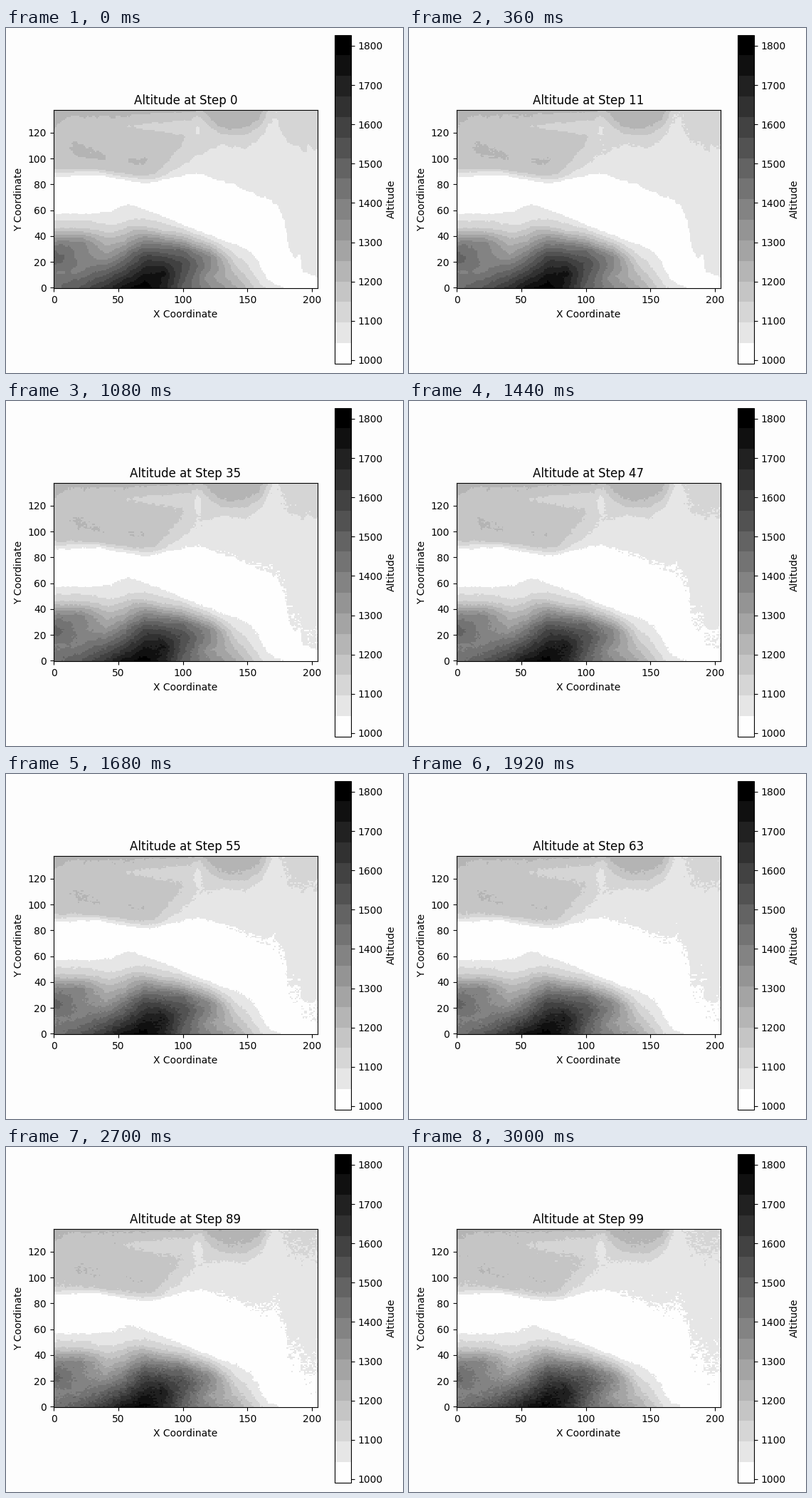
Write a matplotlib script that moves like this. It is 558 px wide and 484 px high and loops after 3.06 s.

```python
import numpy as np
import matplotlib.pyplot as plt
from matplotlib.animation import FuncAnimation
from matplotlib.colors import ListedColormap

W, H, DPI = 558, 484, 100
FRAMES, INTERVAL, LAST = 51, 60, 99
NX, NY = 205, 138
LO, HI, BANDS = 990.9, 1828.1, 16
L1, L2, L3, L4 = LO + (HI - LO) / BANDS * np.arange(1, 5)

rng = np.random.default_rng(7)
xs = np.arange(NX)
ys = np.arange(NY)
X, Y = np.meshgrid(xs, ys)


def curve(x, y):
    return np.interp(xs, x, y)


# River banks and the slope lines north of them
south = curve([0, 24, 45, 57, 65, 82, 107, 131, 147, 157, 166, 178],
              [57, 57, 59, 65, 62, 56, 45, 36, 31, 22, 5, 0])
north = curve([0, 35, 57, 72, 96, 110, 129, 150, 172, 178, 182, 190, 192, 205],
              [86, 88, 83, 81, 86, 88, 82, 74, 64, 50, 23, 22, 9, 7])
slope = curve([0, 30, 68, 78, 87, 102, 120, 130, 149, 161, 166, 172],
              [88.5, 90, 83.5, 83.5, 87, 96, 106, 111, 109, 118, 131, 150])
shelf = curve([0, 30, 68, 78, 90, 104, 110, 129, 148, 160, 166, 172],
              [90.5, 91.5, 86, 87.5, 100, 113, 130, 119, 118, 125, 138, 152])
crest = curve([0, 12, 100, 115, 127, 137, 148, 158, 163, 172],
              [124, 133, 134, 135, 124, 121, 123, 129, 140, 155])

# Southern hills: altitude by share of the way from the bottom to the bank
HILL_X = [0, 20, 40, 55, 70, 85, 100, 120, 140, 160]
HILL_S = [0, 0.2, 0.4, 0.6, 0.8]
HILLS = [
    [1440, 1530, 1640, 1760, 1825, 1690, 1500, 1375, 1265, 1110],
    [1402, 1410, 1490, 1580, 1708, 1740, 1540, 1320, 1220, 1090],
    [1515, 1390, 1330, 1405, 1585, 1595, 1565, 1385, 1175, 1070],
    [1400, 1400, 1230, 1225, 1365, 1410, 1455, 1375, 1130, 1056],
    [1150, 1150, 1105, 1088, 1130, 1145, 1215, 1200, 1085, 1049],
]


def column(i, hills):
    """Altitude along one column, from the bottom edge to the top."""
    s, n = max(south[i], 0.5), north[i]
    a = max(slope[i], n + 1)
    b = max(shelf[i], a + 1)
    c = max(crest[i], b + 1)
    bed = s + (n - s) * np.array([0.25, 0.5, 0.75])
    y = [*(s * np.array(HILL_S)), s, *bed, n, a, b,
         b + 0.25 * (c - b), c - 0.2 * (c - b), c, max(c + 4, NY)]
    h = [*hills, L1, 1022, 1015, 1022, L1, L2, L3, 1176, 1187, L4, 1255]
    return np.interp(ys, y, h)


def mound(cx, cy, rx, ry, tilt=0, power=2):
    t = np.radians(tilt)
    u = (X - cx) * np.cos(t) + (Y - cy) * np.sin(t)
    v = (Y - cy) * np.cos(t) - (X - cx) * np.sin(t)
    return np.exp(-np.hypot(u / rx, v / ry) ** power)


def hollow():
    """Shallow trough that widens to the east."""
    width = 3 + 0.16 * np.clip(X - 52, 0, None)
    ends = np.clip((X - 48) / 10, 0, 1) * np.clip((122 - X) / 10, 0, 1)
    return ends * np.exp(-((Y - 124.5) / width) ** 2)


def blur(z, passes):
    for _ in range(passes):
        p = np.pad(z, 1, mode="edge")
        z = (p[:-2, 1:-1] + p[2:, 1:-1] + p[1:-1, :-2] + p[1:-1, 2:]
             + 2 * z) / 6
    return z


def terrain():
    rows = [np.interp(xs, HILL_X + [178], row + [L1]) for row in HILLS]
    z = np.stack([column(i, h) for i, h in enumerate(zip(*rows))], axis=1)
    z += 32 * mound(27, 102, 26, 8.5, tilt=-22)
    z += 32 * mound(66, 96, 15, 6.5)
    z += 22 * mound(194, 126, 24, 26, power=4)
    z -= 45 * hollow()
    z = blur(z, 2)
    rough = blur(rng.normal(size=z.shape), 4)
    z += rough / rough.std() * (0.8 + 0.006 * np.clip(z - 1000, 0, 500))
    return np.round((z - 2) / 5) * 5 + 2


def random_walk():
    n = rng.normal(size=(FRAMES, NY, NX))
    n = (n + 0.7 * np.roll(n, 1, axis=2)) / 1.22
    n[0] = 0
    return np.cumsum(n, axis=0) / np.sqrt(FRAMES)


base = terrain()
rise = np.clip(base - 1000, 0, 500)
wear = 0.08 + 0.0002 * rise
spread = 1.5 + 0.025 * rise
walk = random_walk()


def altitude(step, i):
    grain = walk[i] * spread * np.sqrt(step / LAST)
    return base - wear * step + grain


def box(left, top, right, bottom):
    return [left / W, 1 - bottom / H, (right - left) / W, (bottom - top) / H]


plt.rcParams["font.family"] = "DejaVu Sans"
fig = plt.figure(figsize=(W / DPI, H / DPI), dpi=DPI, facecolor="#fdfdfd")
ax = fig.add_axes(box(66.5, 115.2, 438, 365.3))
cax = fig.add_axes(box(461.5, 9.5, 484.5, 471))

greys = np.append(254, np.linspace(230, 0, BANDS - 1)) / 255
cmap = ListedColormap([(g, g, g) for g in greys])
im = ax.imshow(base, cmap=cmap, vmin=LO, vmax=HI, origin="lower",
               aspect="auto", interpolation="nearest")
ax.set_xlabel("X Coordinate")
ax.set_ylabel("Y Coordinate")
title = ax.set_title("Altitude at Step 0")
fig.colorbar(im, cax=cax).set_label("Altitude")


def update(i):
    step = max(0, 2 * i - 1)
    im.set_data(altitude(step, i))
    title.set_text(f"Altitude at Step {step}")
    return im, title


anim = FuncAnimation(fig, update, frames=FRAMES, interval=INTERVAL,
                     repeat=True, repeat_delay=0)
plt.show()
```
